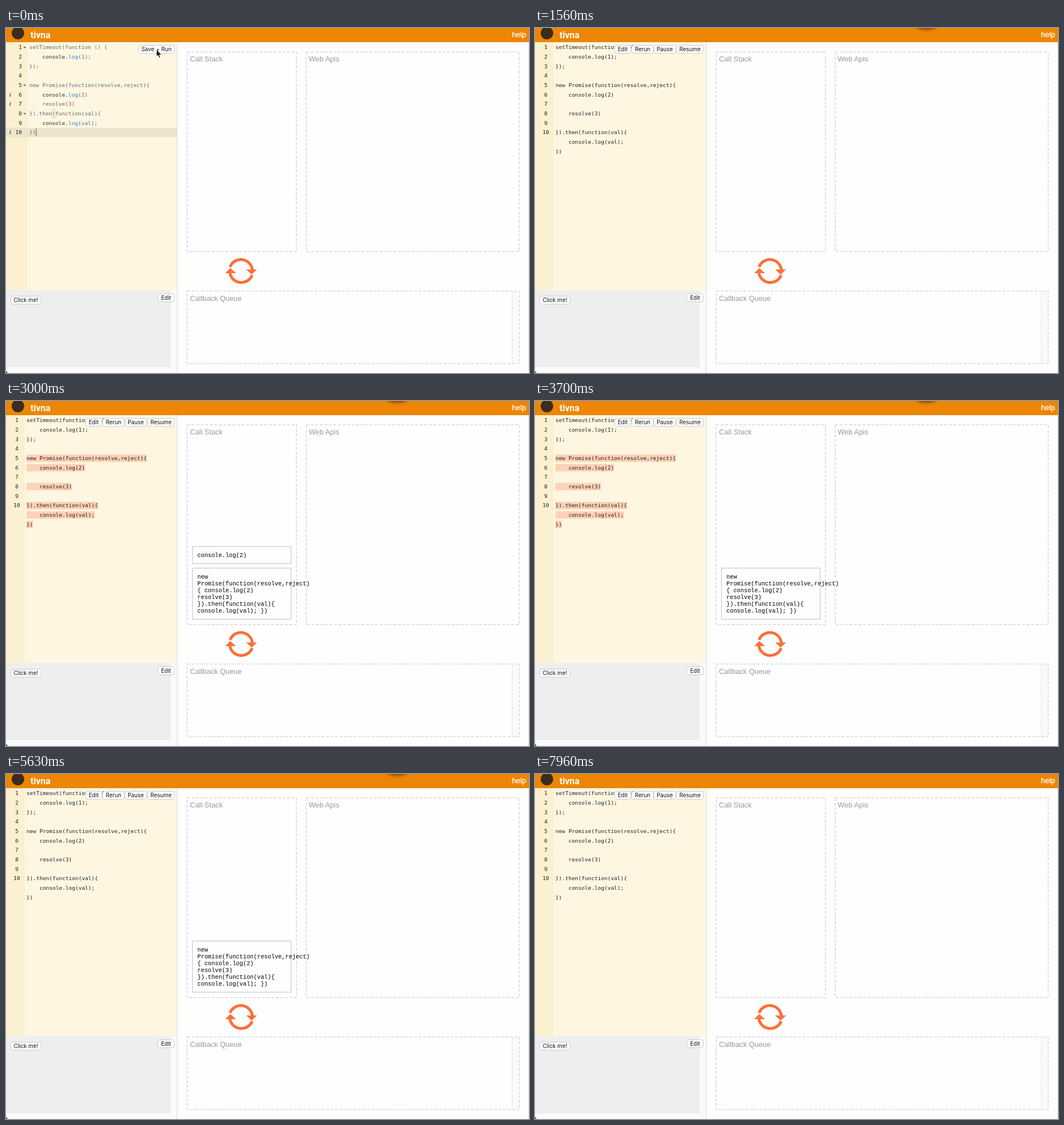
Recreate the animation shown at these times as an HTML page. Size 921 by 608 pixels, loop 8000 ms.

```html
<!DOCTYPE html>
<html lang="en">
<head>
<meta charset="utf-8">
<title>Event loop</title>
<style>
  html, body { margin: 0; width: 100%; height: 100%; overflow: hidden; background: #fefefe; }
  svg { display: block; width: 921px; height: 608px; }
  text { white-space: pre; }
  .code { font: 9.52px "DejaVu Sans Mono", monospace; fill: #222; }
  .editor { fill: #586e75; }
  .frame { font: 10.32px "Liberation Mono", monospace; fill: #000; }
  .label { font: 12.8px "Liberation Sans", sans-serif; fill: #999; }
  .button { font: 9.9px Inter, sans-serif; fill: #111; text-anchor: middle; }
  .panel { fill: none; stroke: #d6d6d6; stroke-width: 1.5; stroke-dasharray: 5 3; }
  .info { font: italic bold 9.5px "Liberation Serif", serif; fill: #444; }
</style>
</head>
<body>
<svg viewBox="0 0 921 608">
  <defs>
    <filter id="blur" x="-50%" y="-100%" width="200%" height="300%"><feGaussianBlur stdDeviation="2.5"/></filter>
  </defs>
  <rect width="921" height="608" fill="#fefefe"/>
  <rect y="25" width="301" height="437" fill="#fff6e2"/>
  <rect id="gutter" y="25" width="38" height="437" fill="#fbf0cf"/>
  <rect y="462" width="301" height="146" fill="#fafafa"/>
  <rect y="462" width="290" height="136" fill="#eee"/>
  <path d="M301.5 25V608M920.5 25V608" stroke="#dcdcdc"/>
  <path d="M0 604V608H4Q1 607 0 604" fill="#333"/>

  <rect width="921" height="25" fill="#ec8604"/>
  <circle cx="21" cy="9" r="11" fill="#3a2c20"/>
  <text x="43" y="18" fill="#fff" style="font:bold 16px Roboto,sans-serif">tivna</text>
  <text x="891" y="16" fill="#fff" stroke="#fff" stroke-width=".3" style="font:13.2px 'Liberation Sans',sans-serif">help</text>
  <ellipse id="shadow" cx="689" cy="-3" rx="18" ry="6" fill="#5a3000" opacity=".75" filter="url(#blur)"/>

  <rect x="891" y="464" width="12.5" height="127" fill="#fafafa"/>
  <path d="M891.5 464V591" stroke="#e6e6e6"/>
  <rect class="panel" x="319" y="42" width="192.5" height="352"/>
  <rect class="panel" x="528.7" y="42" width="375" height="352"/>
  <rect class="panel" x="319" y="463.5" width="584.7" height="128"/>
  <text class="label" x="324" y="59">Call Stack</text>
  <text class="label" x="533" y="59">Web Apis</text>
  <text class="label" x="324" y="480.5">Callback Queue</text>

  <path d="M394.5 421A20.5 20.5 0 0 1 434 427M433.5 435.5A20.5 20.5 0 0 1 394 430" fill="none" stroke="#fa703a" stroke-width="5"/>
  <path d="M423 425.5H442L432.5 434.5ZM386 432H405L395 423Z" fill="#fa703a"/>

  <g id="editView"></g>
  <g id="runView"></g>
  <g id="shared"></g>
  <g id="stack"></g>
  <path id="cursor" d="M0 0V12.5L2.8 10L5 14.6L7.2 13.6L5.1 9.2H9Z" fill="#111" stroke="#fff" stroke-width=".9"/>
</svg>
<script>
const $ = id => document.getElementById(id);
const LOOP = 8000, STEP = 750, FADE = 150, RUN_AT = 240, START = 370;
const CHAR = 9.52 * 0.602, LINE = 16.67;
const rowY = row => 34 + row * LINE;
const escapeText = s => s.replace(/&/g, '&amp;').replace(/</g, '&lt;');

const text = (cls, x, y, body, extra = '') =>
  `<text class="${cls}" x="${x}" y="${y}" ${extra}>${body}</text>`;

const button = (x, y, w, caption) =>
  `<rect x="${x + .5}" y="${y + .5}" width="${w - 1}" height="14" rx="3" fill="#fff" stroke="#c9c9c9"/>` +
  text('button', x + w / 2, y + 11, caption);

const source = `setTimeout(function () {
    console.log(1);
});

new Promise(function(resolve,reject){
    console.log(2)
    resolve(3)
}).then(function(val){
    console.log(val);
})`.split('\n');

// The running view leaves a blank row after each unterminated statement.
const runLines = source.flatMap(line => /\)$/.test(line) && line[0] === ' ' ? [line, ''] : [line]);

const colour = line => escapeText(line)
  .replace(/\d/g, '<tspan fill="#d33682">$&</tspan>')
  .replace('console.log', '<tspan fill="#333">console.</tspan><tspan fill="#268bd2">log</tspan>');

function buildEditView() {
  let out = `<rect y="${rowY(9) - 8.3}" width="301" height="16.6" fill="#ede5cb"/>`;
  source.forEach((line, row) => {
    const y = rowY(row) + 3.4;
    out += text('code', 28, y, row + 1, 'text-anchor="end"') + text('code editor', 41, y, colour(line));
  });
  for (const row of [0, 4, 7]) out += `<path d="M30.5 ${rowY(row) - 1}h5l-2.5 3z" fill="#666"/>`;
  for (const row of [5, 6, 9]) out += text('info', 6, rowY(row) + 3.4, 'i');
  out += `<rect x="81" y="${rowY(7) - 7}" width="5.5" height="14" fill="none" stroke="#c8c3b2" stroke-width=".8"/>`;
  out += `<path d="M53.2 ${rowY(9) - 7}v14" stroke="#555"/>`;
  return out + button(233, 30, 64, 'Save + Run');
}

const highlight = (row, from = 0) => runLines[row] &&
  `<rect x="${36 + from * CHAR}" y="${rowY(row) - 6.3}" width="${(runLines[row].length - from) * CHAR}" height="13" fill="#ffd1b6"/>`;

function buildRunView() {
  let out = '<g id="marks"></g>';
  runLines.forEach((line, row) => {
    const y = rowY(row) + 3.4;
    if (row < 10) out += text('code', 19, y, row + 1, 'text-anchor="middle"');
    out += text('code', 36, y, escapeText(line));
  });
  return out + button(140, 30, 29, 'Edit') + button(170, 30, 39, 'Rerun') +
    button(209, 30, 39, 'Pause') + button(249, 30, 48, 'Resume');
}

// Calls in push order; begin and end are counted in steps after START.
const calls = [
  { begin: 0, end: 1, rows: [0, 1, 2], lines: ['setTimeout(function () {', 'console.log(1); })'] },
  { begin: 2, end: 7, rows: [4, 5, 6, 7, 8, 9, 10, 11], lines: ['new', 'Promise(function(resolve,reject)',
    '{ console.log(2)', 'resolve(3)', '}).then(function(val){', 'console.log(val); })'] },
  { begin: 3, end: 4, rows: [5], indent: 4, lines: ['console.log(2)'] },
  { begin: 5, end: 6, rows: [7], indent: 4, lines: ['resolve(3)'] },
  { begin: 8, end: 9, rows: [10], indent: 4, lines: ['console.log(val)'] },
];

const clamp = v => Math.max(0, Math.min(1, v));

function drawCalls(t) {
  let bottom = 384.5, boxes = '', marks = '';
  for (const { begin, end, rows, indent, lines } of calls) {
    const since = t - START - begin * STEP, after = t - START - end * STEP;
    const alpha = clamp(since / FADE) * (1 - clamp(after / FADE) ** 2);
    if (alpha <= 0) continue;
    if (after < 0) marks += rows.map(row => highlight(row, indent)).join('');
    const height = lines.length * 12 + 18, top = bottom - height;
    boxes += `<g opacity="${alpha}"><rect x="328.5" y="${top}" width="173.5" height="${height}" fill="#fefefe" stroke="#ccc" stroke-width="1.3"/>` +
      lines.map((line, i) => text('frame', 337, top + 18.5 + i * 12, line)).join('') + '</g>';
    bottom = top - 8;
  }
  $('stack').innerHTML = boxes;
  $('marks').innerHTML = marks;
}

function drawCursor(t) {
  const p = clamp((t - 220) / 340), ease = p * p * (3 - 2 * p);
  const exit = Math.max(0, t - 560);
  const x = 265 + 268 * ease + exit * .5, y = 38 - 14 * ease - exit * .2;
  $('cursor').setAttribute('transform', `translate(${x} ${y})`);
}

const show = (id, on) => $(id).style.display = on ? '' : 'none';

function draw(t) {
  const running = t >= RUN_AT;
  show('editView', !running);
  show('runView', running);
  show('shadow', t > 900 && t < 7650);
  $('gutter').setAttribute('width', running ? 33 : 38);
  drawCursor(t);
  drawCalls(t);
}

$('editView').innerHTML = buildEditView();
$('runView').innerHTML = buildRunView();
$('shared').innerHTML = button(8, 472, 54, 'Click me!') + button(267, 468, 30, 'Edit');

const origin = performance.now();
function tick() {
  draw((performance.now() - origin) % LOOP);
  requestAnimationFrame(tick);
}
tick();
</script>
</body>
</html>
```
